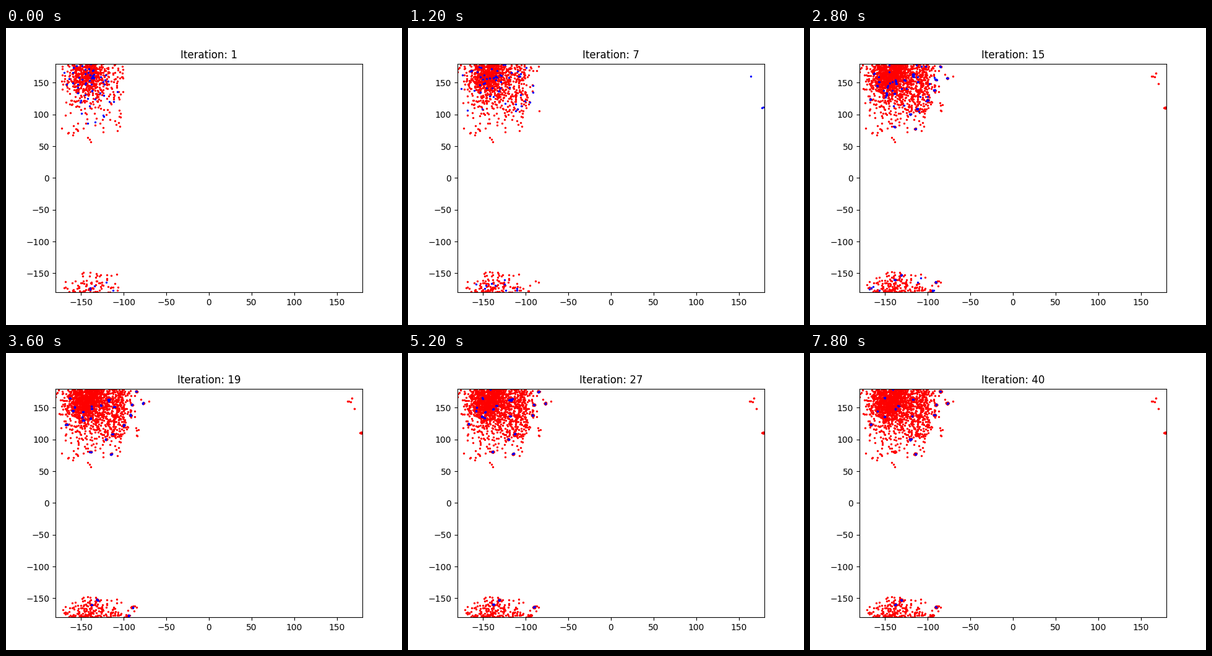
A matplotlib script that plays this animation: 640x480 px, repeating every 8000 ms.

```python
import numpy as np
import matplotlib.pyplot as plt
from matplotlib.animation import FuncAnimation

STEPS = 40
SETTLE = 13          # iteration where walkers start gathering in clusters
rng = np.random.default_rng(12)

# Walkers that crossed the left edge and came out on the right
FAR = [(164, 160), (178.5, 111), (170.5, 148), (168, 165), (178, 174)]

# Clusters that survive to the end
KEEP = [(-118, 162.6), (-85, 175.5), (-77, 157), (-90.3, 154.5),
        (-92, 138.2), (-114.8, 77.3), (-167, 124), (-159, 145),
        (-138, -160.3), (-131, -152.7), (-90.2, -164), (-120.5, 100.3)]


def wrap(p):
    return (p + 180) % 360 - 180


def inside(x, y, left, right):
    u = ((x + 138) / 40) ** 2
    v = ((x + 132) / 40) ** 2
    return left < x < right and 80 + 32 * u < y < 214 - 14 * v


def cloud(count, mix, left, right):
    """Points around the main basin: dense core, wide halo, right flank."""
    pts = []
    while len(pts) < count:
        kind = rng.choice(3, p=mix)
        if kind == 0:
            x, y = rng.normal(-142, 11), rng.normal(159, 13)
        elif kind == 1:
            x = rng.normal(-138, 21)
            dy = rng.normal()
            y = 160 + dy * (23 if dy > 0 else 32)
        else:
            x, y = rng.normal(-107, 9), rng.uniform(102, 184)
        if inside(x, y, left, right):
            pts.append((x, y))
    return wrap(np.array(pts).reshape(-1, 2))


def rim(count):
    """Sparse points below the cloud, lowest in the middle."""
    x = rng.uniform(-173, -100, count)
    low = 55 + 28 * ((x + 138) / 38) ** 2
    return np.column_stack([x, low + 30 * rng.random(count) ** 1.5])


def scouts(n):
    """A few walkers past the right side of the cloud."""
    x = -98 + 0.9 * n + np.abs(rng.normal(0, 8, 2))
    y = rng.uniform(105, 200, 2)
    return wrap(np.column_stack([np.minimum(x, -67), y]))


def far(n):
    """Arrivals on the right, then steps close to them."""
    if n < 7:
        return np.empty((0, 2))
    known = np.array(FAR[:2 + (n - 7) // 2])
    near = known[rng.integers(len(known))] + rng.normal(0, 2.5, 2)
    fresh = known if n == 7 else known[-1:]
    return np.vstack([fresh, np.minimum(near, 179)])


def make_clusters():
    """Rows of x, y, first and last iteration."""
    rows = [(x, y, SETTLE, STEPS) for x, y in KEEP]
    for x, y in cloud(16, (0.2, 0.5, 0.3), -178, -88):
        rows.append((x, y, SETTLE, rng.integers(20, 33)))
    for x, y in cloud(6, (0.4, 0.6, 0), -178, -110):
        rows.append((x, y, rng.integers(20, 26), STEPS))
    return rows


def walkers(n, clusters):
    if n == 1:
        return cloud(62, (0.35, 0.65, 0), -172, -100)
    if n < SETTLE:
        return np.vstack([cloud(66, (0.2, 0.55, 0.25), -180, -99 + 0.9 * n),
                          scouts(n), far(n)])
    spread = max(0, 50 - 10 * (n - SETTLE))
    parts = [cloud(spread, (0.1, 0.6, 0.3), -180, -88)]
    for x, y, first, last in clusters:
        if first <= n <= last:
            parts.append(rng.normal((x, y), 0.5, (3, 2)))
    return np.vstack(parts)


start = np.vstack([rim(26), cloud(700, (0.45, 0.52, 0.03), -173, -100)])
clusters = make_clusters()
current = [walkers(n, clusters) for n in range(1, STEPS + 1)]

fig, ax = plt.subplots(figsize=(6.4, 4.8), dpi=100)
ax.set_xlim(-180, 180)
ax.set_ylim(-180, 180)
title = ax.set_title("Iteration: 1", pad=6.4)
past = ax.scatter([], [], s=2, color="red")
now = ax.scatter([], [], s=2, color="blue")


def draw(i):
    past.set_offsets(np.vstack([start] + current[:i]))
    now.set_offsets(current[i])
    title.set_text(f"Iteration: {i + 1}")
    return past, now, title


anim = FuncAnimation(fig, draw, frames=STEPS, interval=200, repeat=True,
                     repeat_delay=0, blit=False)
plt.show()
```
